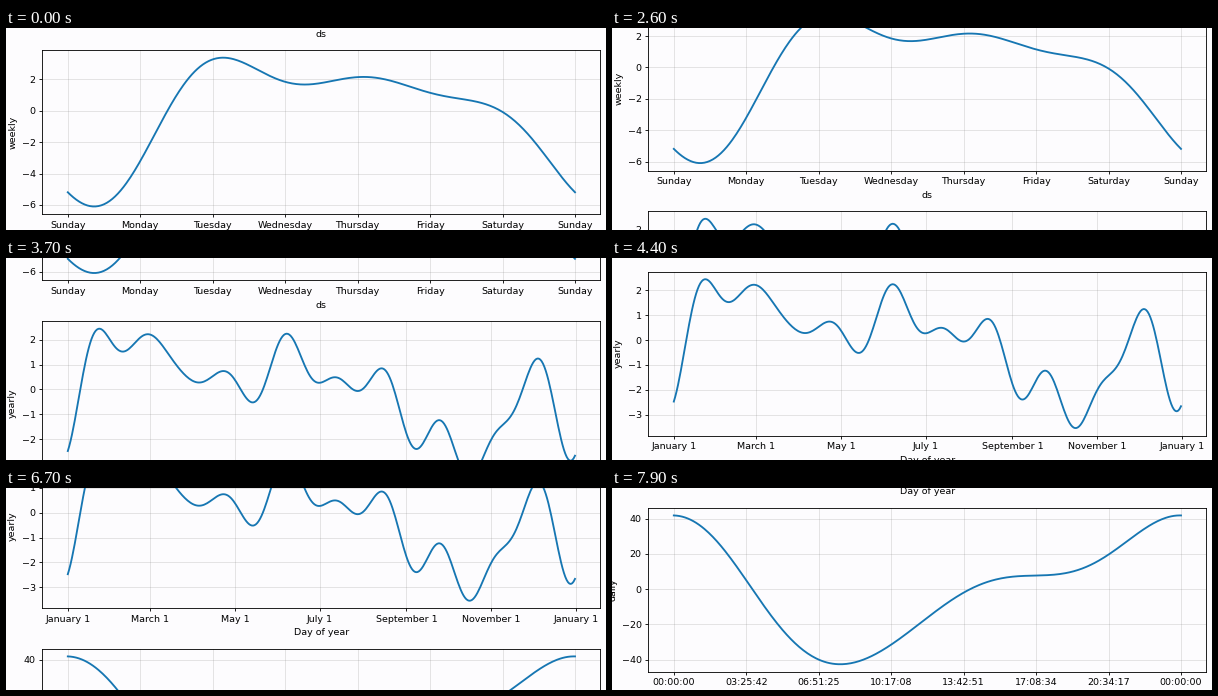
These frames come from a looping animation (600 px wide and 202 px high, 8 s). A matplotlib script:

```python
import numpy as np
import matplotlib.pyplot as plt
from matplotlib.animation import FuncAnimation

W, H, DPI = 600, 202, 100
PX = 72 / DPI                      # one pixel in points
FRAMES, STEP = 80, 100
X0, SPAN = 61.8, 507.2             # stage x of the first sample, width of the data
MARGIN = 0.05 * SPAN
REST_TOP, AXES_H, PITCH = 6, 163.7, 204.5
BLUE, PAPER = "#1676b2", "#fdfcfe"

plt.rcParams.update({
    "font.family": "DejaVu Sans",
    "font.size": 9.45 * PX,
    "axes.linewidth": 0.85 * PX,
    "axes.labelpad": 4.4 * PX,
    "axes.facecolor": PAPER,
    "figure.facecolor": PAPER,
    **{f"{a}tick.major.{k}": v * PX for a in "xy"
       for k, v in (("size", 3.3), ("pad", 3.4), ("width", 0.85))},
})


def basis(x, order, period):
    """Fourier terms and their slopes at stage positions x."""
    n = 2 * np.pi * np.arange(1, order + 1) / period
    a = np.outer(np.asarray(x) - X0, n)
    one = np.ones((len(a), 1))
    terms = np.hstack([one, np.cos(a), np.sin(a)])
    slopes = np.hstack([0 * one, -n * np.sin(a), n * np.cos(a)])
    return terms, slopes


def seasonal(order, period, points, turns=()):
    """Fit a Fourier series through points, level at the turns."""
    x, y = np.array([*turns, *points], float).T
    terms, slopes = basis(x, order, period)
    k = len(turns)
    lhs = np.vstack([terms, 3 * slopes[:k]])
    rhs = np.concatenate([y, np.zeros(k)])
    coef = np.linalg.lstsq(lhs, rhs, rcond=None)[0]
    xs = np.linspace(X0, X0 + SPAN, 365)
    return xs, basis(xs, order, period)[0] @ coef


sevenths = X0 + SPAN * np.arange(8) / 7


def by_sevenths(*values):
    return seasonal(3, SPAN, list(zip(sevenths, values)))


weekly = by_sevenths(-5.19, -3.2, 3.28, 1.85, 2.15, 1.15, -0.07)
daily = by_sevenths(41.8, 5, -40, -31.5, -2, 7.7, 19.6)
yearly = seasonal(
    10, SPAN * 365.25 / 364,
    points=[(X0, -2.45), (486, -1.96), (505, -1.05)],
    turns=[(93.5, 2.44), (117, 1.52), (141.5, 2.22), (193, 0.28),
           (217.5, 0.74), (247, -0.52), (280.5, 2.24), (313, 0.27),
           (329, 0.49), (352, -0.06), (376, 0.85), (410, -2.39),
           (433, -1.23), (463, -3.53), (532.5, 1.24), (565, -2.88)])

days = "Sunday Monday Tuesday Wednesday Thursday Friday Saturday Sunday".split()
months = [m + " 1" for m in
          "January March May July September November January".split()]
firsts = np.arange("2017-01", "2018-02", 2, dtype="datetime64[M]")
month_days = firsts.astype("datetime64[D]").astype(int)
month_x = X0 + SPAN * (month_days - month_days[0]) / 364
clock = [f"{s // 3600:02}:{s // 60 % 60:02}:{s % 60:02}"
         for s in (86400 * i // 7 % 86400 for i in range(8))]

fig = plt.figure(figsize=(W / DPI, H / DPI), dpi=DPI)


def panel(curve, name, xlabel, xticks, labels, yticks):
    ax = fig.add_axes([0, 0, 1, 1], label=name)
    ax.plot(*curve, color=BLUE, lw=1.85 * PX)
    ax.grid(True, color="gray", lw=PX, alpha=0.2)
    ax.set_xlim(X0 - MARGIN, X0 + SPAN + MARGIN)
    ax.set_xticks(xticks, labels)
    ylim = ax.get_ylim()
    ax.set_yticks(yticks)
    ax.set_ylim(ylim)
    ax.set_xlabel(xlabel)
    ax.set_ylabel(name)
    return ax


panels = [
    panel(weekly, "weekly", "ds", sevenths, days, range(-6, 3, 2)),
    panel(yearly, "yearly", "Day of year", month_x, months, range(-3, 3)),
    panel(daily, "daily", "", sevenths, clock, range(-40, 41, 20)),
]
# x label of the plot above the first panel
panels[0].annotate("ds", (0.5, 1), xycoords="axes fraction",
                   xytext=(0, 15.5 * PX), textcoords="offset points",
                   ha="center", va="center", annotation_clip=False)


def ease(u):
    """Quick start, long soft landing."""
    return 1 - (1 - np.clip(u, 0, 1) ** 2.4) ** 4.85


def scrolled(t):
    """Panels passed so far: one swipe every four seconds."""
    return sum(ease((t + 2.2 - 4 * k) / length)
               for k, length in enumerate((3.2, 3.5, 3.0)))


def update(i):
    passed = scrolled(i * STEP / 1000)
    for k, ax in enumerate(panels, 1):
        top = REST_TOP + PITCH * (k - passed)
        ax.set_visible(-PITCH < top < H + 5)
        ax.set_position([(X0 - MARGIN) / W, 1 - (top + AXES_H) / H,
                         (SPAN + 2 * MARGIN) / W, AXES_H / H])
    return panels


anim = FuncAnimation(fig, update, frames=FRAMES, interval=STEP,
                     repeat=True, repeat_delay=0, blit=False)
plt.show()
```
